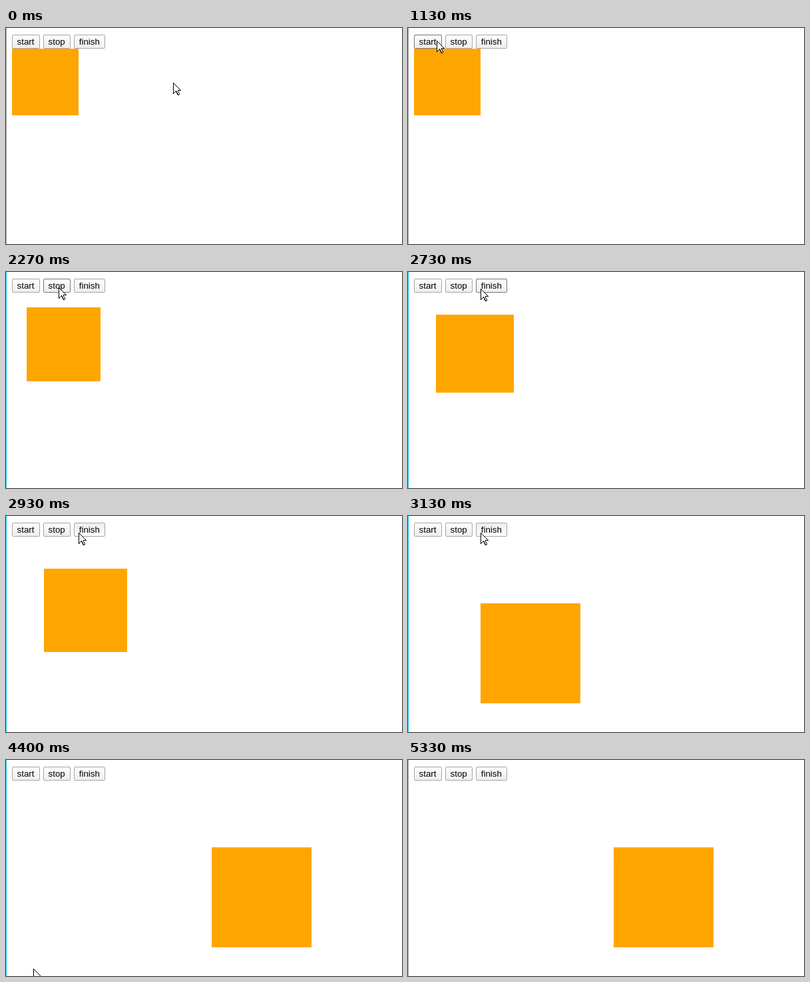
An HTML page that plays this animation: 595 by 324 pixels, repeating every 5540 ms.

```html
<!DOCTYPE html>
<html lang="en">
<head>
<meta charset="utf-8">
<title>start / stop / finish</title>
<style>
  html, body { margin: 0; width: 100%; height: 100%; overflow: hidden; background: #fff; }
  #stage { position: relative; width: 595px; height: 324px; overflow: hidden; background: #fff; }
  #stage > * { position: absolute; }
  #edge { left: 0; top: 0; width: 1px; height: 324px; background: #a0a0a0; }
  #edge.active { background: #12c0ee; }
  #box { background: #ffa500; }
  #bar { left: 8.6px; top: 10px; display: flex; gap: 5px; }
  .btn {
    padding: 0 7px;
    border: 1px solid #a6a6a6; border-radius: 2px;
    background: linear-gradient(#fdfdfd, #eee);
    font: 13.333px/19px Arial, "Liberation Sans", sans-serif;
    color: #000; white-space: nowrap;
  }
  .btn.hover { border-color: #757575; }
  .btn.press { border-color: #a6a6a6; background: linear-gradient(#eee, #fdfdfd); }
  #cursor { left: 0; top: 0; width: 13px; height: 20px; overflow: visible; }
</style>
</head>
<body>
<div id="stage">
  <div id="edge"></div>
  <div id="bar">
    <div class="btn">start</div>
    <div class="btn">stop</div>
    <div class="btn">finish</div>
  </div>
  <div id="box"></div>
  <svg id="cursor" viewBox="0 0 13 20" shape-rendering="crispEdges">
    <path d="M.5 .5V16.5L4.5 12.5L7.5 18.5H8.5L9.5 17.5L7.5 12.5V11.5H11.5Z" fill="#fff" stroke="#000"/>
  </svg>
</div>
<script>
const LOOP = 5540;
const TICK = 200 / 3;

const RUN = 1648, STOP = 2310, RESUME = 2612, FINISH = 3000, JUMP = 3200;
const SWING_TIME = 2000;
const CLICKS = [1600, STOP, 2930, 3130];

// Each glide eases out to its end point.
const HOME = { x: 251, y: 82 };
const GLIDES = [
  { from: 0, to: 70, x: 150, y: 24 },
  { from: 330, to: 1130, x: 43, y: 19 },
  { from: 2000, to: 2270, x: 79, y: 23 },
  { from: 2330, to: 2600, x: 109, y: 25 },
  { from: 3600, to: 3670, x: 97, y: 60 },
  { from: 3670, to: 4470, x: 41, y: 313 },
  { from: 4670, to: 4870, x: 41, y: 324 }
];

const byId = id => document.getElementById(id);
const edge = byId('edge'), box = byId('box'), cursor = byId('cursor');
const buttons = [...document.querySelectorAll('.btn')];

const clamp = v => Math.min(1, Math.max(0, v));
const easeOut = u => 1 - (1 - u) ** 3;
const swing = u => (1 - Math.cos(Math.PI * u)) / 2;

function cursorAt(t) {
  let { x, y } = HOME;
  for (const g of GLIDES) {
    const f = easeOut(clamp((t - g.from) / (g.to - g.from)));
    x += (g.x - x) * f;
    y += (g.y - y) * f;
  }
  return [Math.round(x), Math.round(y)];
}

function progress(t) {
  if (t >= FINISH) return 1;
  const elapsed = Math.min(t, STOP) - RUN + Math.max(0, t - RESUME);
  return swing(clamp(elapsed / SWING_TIME));
}

function drawBox(t) {
  const p = progress(t);
  const x = 9 + 100 * p + (t >= JUMP ? 200 : 0);
  const y = 31 + 100 * p;
  const size = 100 + 50 * p;
  const left = Math.round(x), top = Math.round(y);
  Object.assign(box.style, {
    left: left + 'px',
    top: top + 'px',
    width: Math.round(x + size) - left + 'px',
    height: Math.round(y + size) - top + 'px'
  });
}

function drawButtons(t, x, y) {
  const down = CLICKS.some(c => t >= c && t < c + 70);
  for (const el of buttons) {
    const r = el.getBoundingClientRect();
    const over = x >= r.left && x < r.right && y >= r.top && y < r.bottom;
    el.classList.toggle('hover', over);
    el.classList.toggle('press', over && down);
  }
}

function draw(ms) {
  // the screen updates 15 times a second, on whole 10 ms marks
  const t = Math.round(Math.floor((ms + 3.4) / TICK) * TICK / 10) * 10;
  const [x, y] = cursorAt(t);
  cursor.style.transform = `translate(${x}px, ${y}px)`;
  edge.classList.toggle('active', t >= CLICKS[0] && t < 5330);
  drawButtons(t, x, y);
  drawBox(t);
}

const begin = performance.now();
function loop(now) {
  draw(Math.max(0, now - begin) % LOOP);
  requestAnimationFrame(loop);
}
draw(0);
requestAnimationFrame(loop);
</script>
</body>
</html>
```
